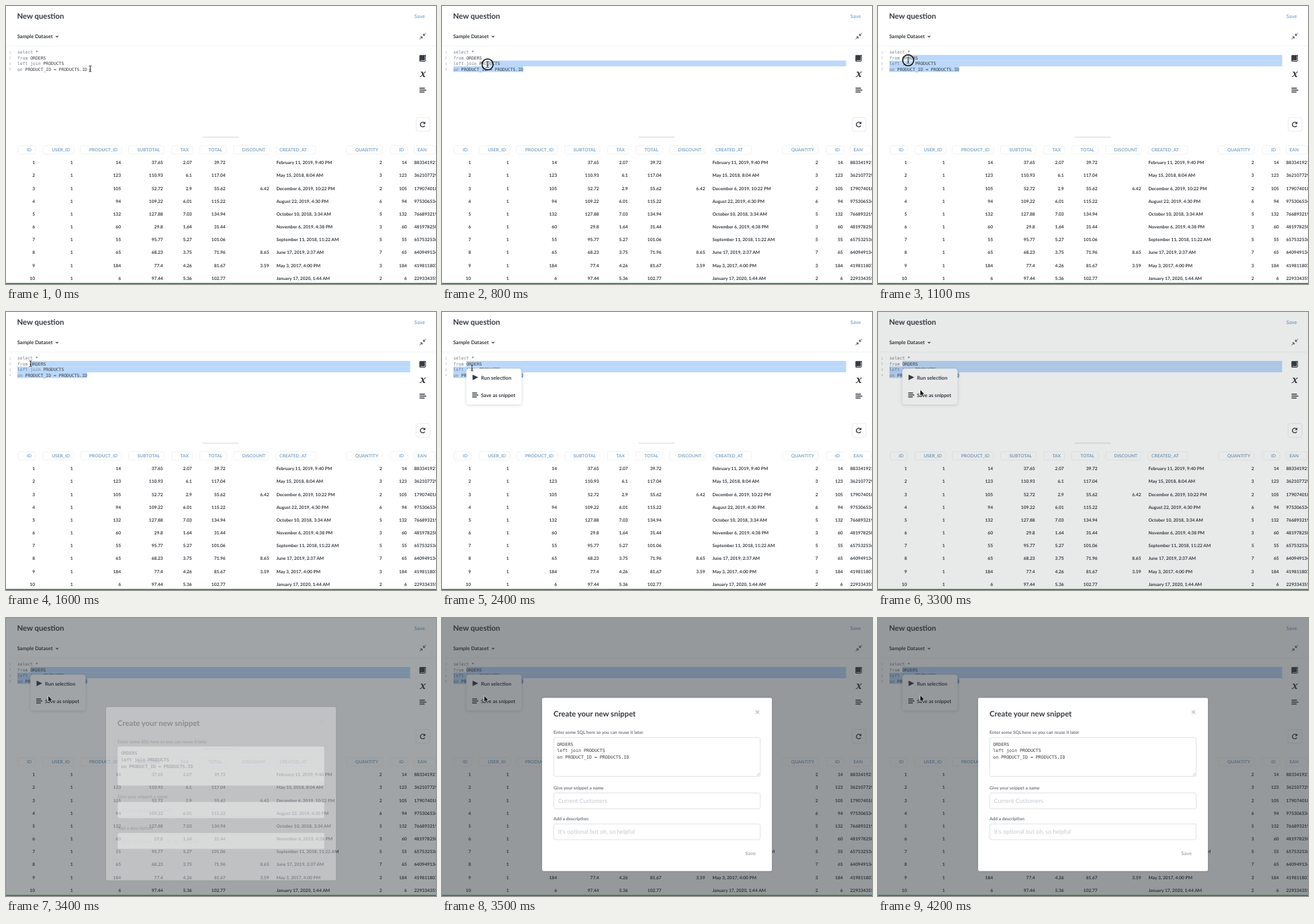
These frames come from a looping animation (640 by 415 pixels, 4400 ms). An HTML page with a canvas:

```html
<!DOCTYPE html>
<html lang="en">
<head>
<meta charset="utf-8">
<title>New question</title>
<style>
html, body { margin: 0; width: 100%; height: 100%; overflow: hidden; background: #fff; }
canvas { display: block; width: 640px; height: 415px; }
</style>
</head>
<body>
<canvas id="stage"></canvas>
<script>
const LOOP = 4400, STEP = 100;
const INK = '#353a40', HEAD = '#7fa5c6', SEL = '#bad8fb', RULE = '#eeeff1';
const CHAR = 3.853, CODE_X = 17, CODE_Y = 68.7, LINE = 8.5;

const canvas = document.getElementById('stage');
const ratio = window.devicePixelRatio || 1;
canvas.width = 640 * ratio;
canvas.height = 415 * ratio;
const c = canvas.getContext('2d');
c.scale(ratio, ratio);
c.textRendering = 'geometricPrecision';

const SANS = 'Lato, sans-serif', MONO = '"DejaVu Sans Mono", monospace';

// Text centred vertically (by cap height) on y
function text(s, x, y, { size = 6.67, color = INK, weight = 700, family = SANS, align = 'left' } = {}) {
  c.font = `${weight} ${size}px ${family}`;
  c.fillStyle = color;
  c.textAlign = align;
  c.fillText(s, x, y + size * 0.36);
}

function code(s, x, y, size = 6.4, color = '#3a3d42') {
  text(s, x, y, { size, color, weight: 400, family: MONO });
}

function rect(x, y, w, h, color) {
  c.fillStyle = color;
  c.fillRect(x, y, w, h);
}

function box(x, y, w, h, r, fill, stroke) {
  c.beginPath();
  c.roundRect(x, y, w, h, r);
  if (fill) { c.fillStyle = fill; c.fill(); }
  if (stroke) { c.lineWidth = 0.8; c.strokeStyle = stroke; c.stroke(); }
}

function path(d, x, y, { fill, stroke, width = 1 } = {}) {
  c.save();
  c.translate(x, y);
  const p = new Path2D(d);
  if (fill) { c.fillStyle = fill; c.fill(p); }
  if (stroke) { c.strokeStyle = stroke; c.lineWidth = width; c.stroke(p); }
  c.restore();
}

const lerp = (a, b, k) => a + (b - a) * k;

// Header, tool icons and drag handle
function chrome() {
  text('New question', 16.5, 15.3, { size: 11.3 });
  text('Save', 623.5, 15, { size: 7.5, color: '#86aed3', align: 'right' });
  text('Sample Dataset', 16.7, 45.2, { size: 7.6 });
  path('M-1.8-.9L0 .9L1.8-.9', 76, 45.5, { stroke: INK, width: 1.1 });
  rect(0, 59.5, 640, 0.7, RULE);

  path('M4.5-4.5L1-1M1-3.6V-1H3.6M-4.5 4.5L-1 1M-3.6 1H-1V3.6', 620.3, 45, { stroke: INK });
  path('M-4-4.8H4.8V4H3.6V5H-3.4Q-5 5-5 3.4V-3.6Q-5-4.8-4-4.8Z', 620.3, 78, { fill: INK });
  path('M-3.4 3.4H3.6V-3.4', 620.3, 78, { stroke: '#fff', width: 0.8 });
  text('x', 620.5, 100.3, { size: 15, family: '"Noto Serif", serif', weight: 'italic 700', align: 'center' });
  lines(615.5, 125.7, 10);
  box(610.4, 166.4, 20.6, 20.6, 3, '#fff', '#e6e8ea');
  path('M2.6-2.5A3.5 3.5 0 1 0 3.1 1.6', 620.2, 177, { stroke: INK, width: 1.4 });
  path('M4-4.4V-.7H.3Z', 620.2, 177, { fill: INK });
  rect(293, 195.1, 53.5, 1.3, '#dcdee1');
}

function lines(x, y, w) {
  [1, 0.7, 1].forEach((k, i) => rect(x, y - 3.8 + i * 2.9, w * (i === 2 ? 0.75 : i ? 1 : 0.8), 1.5, INK));
}

// label, header left edge, header right edge, cell edge, cell alignment
const COLUMNS = [
  ['ID', 38, 43], ['USER_ID', 95, 99.5], ['PRODUCT_ID', 166, 171], ['SUBTOTAL', 229, 233.7],
  ['TAX', 272, 276.7], ['TOTAL', 322, 326.7], ['DISCOUNT', 386, 391.5],
  ['CREATED_AT', 407, 402.5, 'left'], ['QUANTITY', 554, 559.5], ['ID', 592, 596.7], ['EAN', 612.5, 607.5, 'left']
];
const ROWS = `14|37.65|2.07|39.72||February 11, 2019, 9:40 PM|2|8833419218
123|110.93|6.1|117.04||May 15, 2018, 8:04 AM|3|3621077291
105|52.72|2.9|55.62|6.42|December 6, 2019, 10:22 PM|2|1790740184
94|109.22|6.01|115.22||August 22, 2019, 4:30 PM|6|9753065344
132|127.88|7.03|134.94||October 10, 2018, 3:34 AM|5|7668932199
60|29.8|1.64|31.44||November 6, 2019, 4:38 PM|3|4819782507
55|95.77|5.27|101.06||September 11, 2018, 11:22 AM|5|6575325363
65|68.23|3.75|71.96|8.65|June 17, 2019, 2:37 AM|7|6409491341
184|77.4|4.26|81.67|3.59|May 3, 2017, 4:00 PM|3|4198118070
6|97.44|5.36|102.77||January 17, 2020, 1:44 AM|2|2293343551`.split('\n').map((line, i) => {
  const v = line.split('|');
  return [i + 1, 1, ...v.slice(0, 7), v[0], v[7]];
});

function table() {
  for (const [label, x, , align = 'right'] of COLUMNS) {
    c.font = `700 6.67px ${SANS}`;
    const w = c.measureText(label).width;
    if (align === 'left') box(x - 5, 208.5, w + 18, 12.5, 3, null, RULE);
    else box(x - w - 13, 208.5, w + 19, 12.5, 3, null, RULE);
    text(label, x, 214.7, { color: HEAD, align });
  }
  ROWS.forEach((row, r) => row.forEach((v, i) => {
    const [, , x, align = 'right'] = COLUMNS[i];
    text(v, x, 233.9 + r * 19.17, { align });
  }));
}

const QUERY = [['select', ' *'], ['from', ' ORDERS'], ['left join', ' PRODUCTS'], ['on', ' PRODUCT_ID = PRODUCTS.ID']];

function editor(t, [x, y]) {
  const end = CODE_X + 27 * CHAR;
  const rowTop = i => CODE_Y + i * LINE - 4.2;
  if (t >= 500) {
    const row = t >= 1600 || y < 81.5 ? 1 : y < 90.5 ? 2 : 3;
    const col = t >= 1500 ? 5 : Math.round((x - CODE_X) / CHAR);
    const from = CODE_X + Math.min(27, col) * CHAR;
    for (let i = row; i < 4; i++) {
      const left = i === row ? from : CODE_X;
      rect(left, rowTop(i), (i === 3 ? end : 601.5) - left, LINE, SEL);
    }
  }
  QUERY.forEach(([key, rest], i) => {
    const ly = CODE_Y + i * LINE;
    code(i + 1, 4.4, ly, 5, '#b4b8bd');
    code(key, CODE_X, ly, 6.4, '#727d88');
    code(rest, CODE_X + key.length * CHAR, ly);
  });
}

function menu(t, hover) {
  if (t < 1800) return;
  c.save();
  c.globalAlpha = Math.min(1, 0.35 + (t - 1800) / 300);
  c.shadowColor = 'rgba(60,70,80,.22)';
  c.shadowBlur = 5 * ratio;
  c.shadowOffsetY = ratio;
  box(36.3, 84.6, 82, 53.4, 4, '#fff');
  c.shadowColor = 'transparent';
  if (hover) box(36.3, 111.3, 82, 26.7, [0, 0, 4, 4], '#f6f7f9');
  path('M-4-4.2L4.4 0L-4 4.2Z', 49.5, 97.6, { fill: INK });
  text('Run selection', 58, 97.8, { size: 7.5 });
  lines(45, 124, 9);
  text('Save as snippet', 58, 124.1, { size: 7.5 });
  c.restore();
}

function field(label, ly, top, h, hint) {
  text(label, 166, ly, { color: '#747982' });
  box(166.4, top + 0.4, 307.2, h, 2.5, '#fff', '#d9dbde');
  if (hint) text(hint, 172.8, top + h / 2 + 0.4, { size: 8.8, weight: 400, color: '#c4c7cc' });
}

function modal(alpha, dy) {
  c.save();
  c.globalAlpha = alpha;
  c.translate(0, dy);
  c.shadowColor = 'rgba(0,0,0,.15)';
  c.shadowBlur = 3 * ratio;
  box(149, 119.3, 342, 258.5, 2, '#fff');
  c.shadowColor = 'transparent';
  text('Create your new snippet', 166, 143.4, { size: 11.3 });
  path('M-2.6-2.6L2.6 2.6M2.6-2.6L-2.6 2.6', 469.5, 140.5, { stroke: '#b6babf', width: 1.1 });
  field('Enter some SQL here so you can reuse it later', 170.4, 178, 58);
  ['ORDERS', 'left join PRODUCTS', 'on PRODUCT_ID = PRODUCTS.ID'].forEach((s, i) => code(s, 171.3, 188.3 + i * 9.6, 6.6));
  path('M-4 0L0-4M-2 0L0-2', 472.6, 235.2, { stroke: '#a5a8ad', width: 0.6 });
  field('Give your snippet a name', 253.2, 260.7, 23.8, 'Current Customers');
  field('Add a description', 299.8, 307, 23.5, "It's optional but oh, so helpful");
  text('Save', 467, 351.5, { size: 7.5, color: '#a9adb3', align: 'right' });
  c.restore();
}

// Pointer path: time, x, y
const MOVES = [
  [0, 125.3, 93.6], [200, 122, 93.8], [500, 121.5, 93.8], [700, 88, 90], [800, 67.8, 87.2],
  [900, 54, 84], [1000, 47, 82], [1500, 36.5, 77.2], [1700, 36.5, 77.2], [1900, 39, 72.5],
  [2200, 41, 77], [2300, 41, 77], [2900, 63, 116.4], [4100, 63, 116.4], [4200, 63, 115.8], [LOOP, 63, 115.8]
];

function pointerAt(t) {
  const i = MOVES.findIndex(m => m[0] > t);
  const [a, b] = [MOVES[i - 1], MOVES[i]];
  const k = (t - a[0]) / (b[0] - a[0]);
  return [lerp(a[1], b[1], k), lerp(a[2], b[2], k)];
}

function pointer(t, [x, y]) {
  const pressed = (t >= 500 && t < 1600) || t === 3000 || t === 3100;
  if (pressed) {
    c.beginPath();
    c.arc(x, y, 8.2, 0, Math.PI * 2);
    c.fillStyle = 'rgba(255,255,255,.3)';
    c.fill();
    c.strokeStyle = '#111';
    c.lineWidth = 1.6;
    c.stroke();
  }
  if (t >= 3300) {
    path('M0 0V8.2L1.9 6.5L3.2 9.3L4.5 8.7L3.2 6H5.8Z', x, y, { stroke: '#fff', width: 1 });
    path('M0 0V8.2L1.9 6.5L3.2 9.3L4.5 8.7L3.2 6H5.8Z', x, y, { fill: '#111' });
  } else if (y > 85 && t > 2200) {
    path('M-.8 .6Q0-.6 .8 .6V3.4L4.2 4.2Q5.2 4.6 4.9 6L4 9H-.6L-3.2 5.8Q-3.4 4.6-2.2 5L-.8 6Z', x, y, { fill: '#fff', stroke: '#222', width: 0.8 });
  } else {
    const beam = 'M-1.8-4.4Q0-4.4 0-3.4Q0-4.4 1.8-4.4M0-3.6V3.6M-1.8 4.4Q0 4.4 0 3.4Q0 4.4 1.8 4.4M-1 1.4H1';
    path(beam, x, y, { stroke: 'rgba(255,255,255,.7)', width: 1.8 });
    path(beam, x, y, { stroke: '#111', width: 0.9 });
  }
}

function draw(t) {
  const at = pointerAt(t);
  rect(0, 0, 640, 415, '#fff');
  chrome();
  editor(t, at);
  table();
  menu(t, at[1] > 111 && t < 3300);
  if (t >= 3300) {
    const dim = t === 3300 ? 0.11 : t === 3400 ? 0.45 : 0.5;
    rect(0, 0, 640, 414, `rgba(46,53,59,${dim})`);
  }
  if (t === 3400) modal(0.38, 13.7);
  if (t >= 3500) modal(1, 0);
  rect(0, 413.5, 640, 1.5, '#1d7f3a');
  pointer(t, at);
}

const start = performance.now();
function tick() {
  const t = (performance.now() - start) % LOOP;
  draw(Math.floor(t / STEP) * STEP);
  requestAnimationFrame(tick);
}
tick();
</script>
</body>
</html>
```
